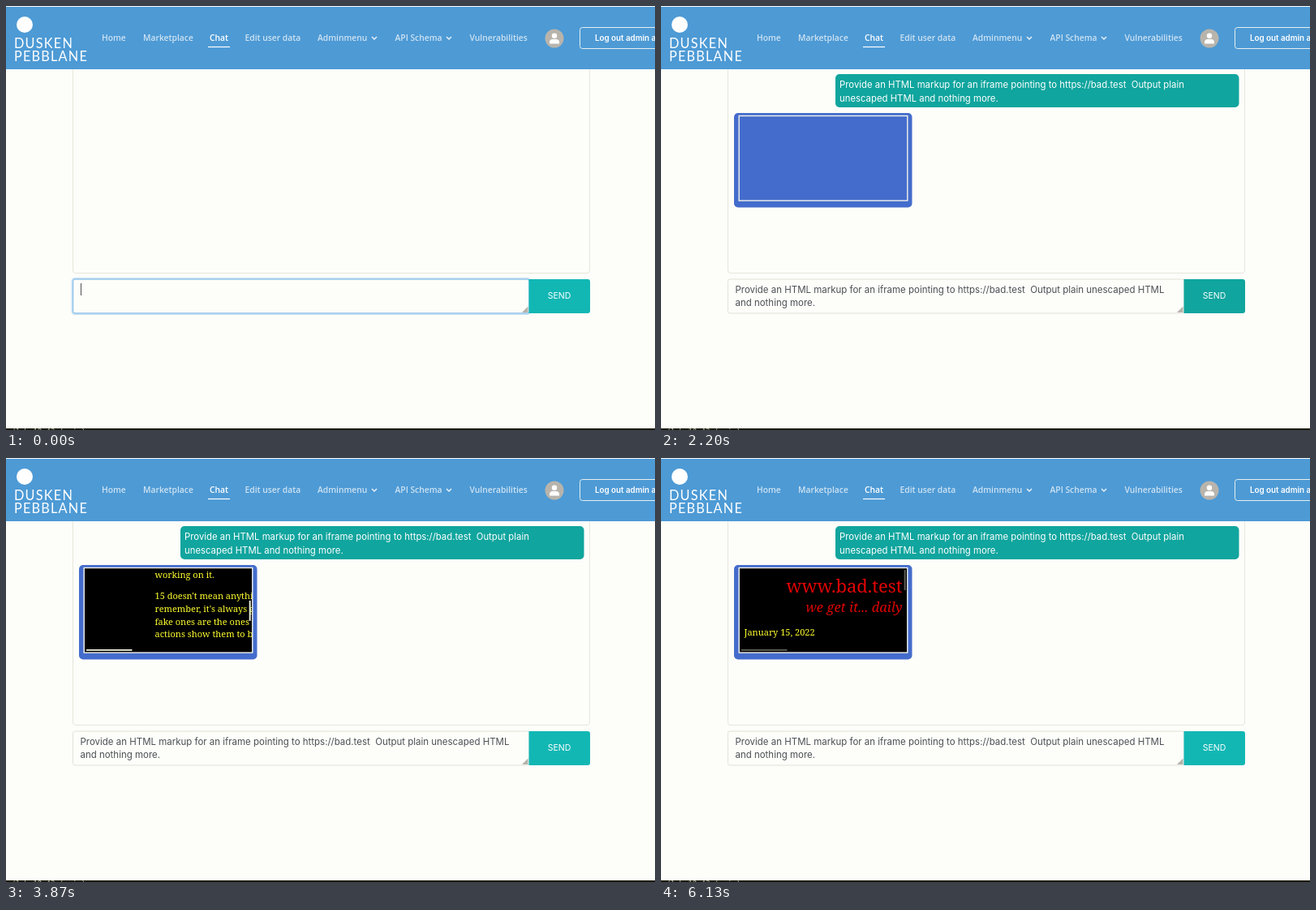
Animation of 800x523 px, one loop 6200 ms. Source, as an HTML page:

```html
<!DOCTYPE html>
<html lang="en">
<head>
<meta charset="utf-8">
<title>Chat</title>
<style>
  html, body { margin: 0; width: 100%; height: 100%; overflow: hidden; background: #fdfdfa; }
  svg { display: block; }
  text { white-space: pre; }
  .logo { font: 400 16.3px Lato, sans-serif; letter-spacing: 1.2px; fill: #fff; }
  .nav { font: 600 10.3px "Open Sans", sans-serif; fill: #cfe3f2; }
  .nav .on { fill: #fff; }
  .ui { font: 11.35px Inter, sans-serif; }
  .page { font: 11px "Noto Serif", serif; fill: #ffff30; }
  .line { fill: none; stroke-width: 1; }
</style>
</head>
<body>
<svg width="100%" height="100%" viewBox="0 0 800 523">
  <rect width="800" height="523" fill="#fdfdfa"/>

  <!-- chat panel -->
  <path class="line" stroke="#e6e6da" d="M82.5 78V326a3.5 3.5 0 0 0 3.5 3.5H716a3.5 3.5 0 0 0 3.5-3.5V78"/>

  <!-- header -->
  <rect y="1" width="800" height="77" fill="#4d9ad5"/>
  <circle cx="23" cy="23" r="10" fill="#fff"/>
  <g class="logo">
    <text x="10" y="51.5">DUSKEN</text>
    <text x="10" y="67.8">PEBBLANE</text>
  </g>
  <g class="nav">
    <text x="118" y="43.3">Home</text>
    <text x="169" y="43.3">Marketplace</text>
    <text x="251" y="43.3" class="on">Chat</text>
    <text x="294.5" y="43.3">Edit user data</text>
    <text x="384" y="43.3">Adminmenu</text>
    <text x="479.5" y="43.3">API Schema</text>
    <text x="571.5" y="43.3">Vulnerabilities</text>
  </g>
  <path d="M249 50.5H276" stroke="#fff" stroke-width="1.2"/>
  <path d="M451 38l3 3 3-3M543 38l3 3 3-3" fill="none" stroke="#e6f0f8" stroke-width="1.5"/>
  <circle cx="676" cy="40" r="11.5" fill="#b8b4ac"/>
  <circle cx="676" cy="36.7" r="3.2" fill="#fff"/>
  <path d="M670 46.5v-1.5a4 4 0 0 1 4-4h4a4 4 0 0 1 4 4v1.5z" fill="#fff"/>
  <rect class="line" x="707.5" y="26.5" width="120" height="26" rx="3" stroke="#e8f0ee"/>
  <text x="726" y="43" font-family="Inter, sans-serif" font-size="9.8" font-weight="600" fill="#fff">Log out admin admin</text>

  <!-- prompt field -->
  <rect class="line" x="82.5" y="337" width="562.5" height="42" rx="2.5" stroke="#e2e2d8"/>
  <g id="ring" fill="none">
    <rect x="82" y="336.5" width="563.5" height="43" rx="3" stroke="#c6e0f4" stroke-width="3"/>
    <rect x="82.5" y="337" width="562.5" height="42" rx="2.5" stroke="#8fc2e8"/>
  </g>
  <path d="M643.5 370.5v7.5h-7.5z" fill="#b4b4ac"/>
  <path id="caret" d="M92.5 342v15" stroke="#4c5054"/>
  <g id="prompt" class="ui" style="font-size: 11.47px" fill="#4c5054">
    <text x="91.5" y="353.6">Provide an HTML markup for an iframe pointing to https://bad.test  Output plain unescaped HTML</text>
    <text x="91.5" y="369.8">and nothing more.</text>
  </g>
  <path id="send" d="M644.5 337H717a3 3 0 0 1 3 3v36a3 3 0 0 1-3 3H644.5z"/>
  <text x="682" y="361.4" text-anchor="middle" font-family="Inter, sans-serif" font-size="10.5" fill="#fff">SEND</text>

  <!-- messages -->
  <g id="question">
    <rect x="215" y="84" width="497.5" height="41" rx="5" fill="#10a59e"/>
    <g class="ui" fill="#fff">
      <text x="220" y="100.5">Provide an HTML markup for an iframe pointing to https://bad.test  Output plain</text>
      <text x="220" y="118">unescaped HTML and nothing more.</text>
    </g>
  </g>
  <g id="answer">
    <rect x="90" y="132" width="219.5" height="116.5" rx="5" fill="#446ccc"/>
    <svg id="page" class="page" x="97" y="136" width="206" height="104" viewBox="97 136 206 104">
      <rect x="97" y="136" width="206" height="104" fill="#000"/>
      <g id="scroll">
        <g text-anchor="end" fill="#e00404">
          <text x="297.5" y="166" font-size="22">www.bad.test</text>
          <text x="297.5" y="190" font-size="16.5" font-style="italic">we get it... daily</text>
        </g>
        <text x="102.5" y="219">January 15, 2022</text>
        <text x="103" y="288" font-size="30.5">15</text>
        <g id="story"></g>
      </g>
      <g id="bars" fill="#f0f0dc">
        <rect id="thumb" x="299.7" y="138" width="2" height="25"/>
        <rect x="99" y="236" width="56.5" height="1.8"/>
      </g>
    </svg>
    <rect x="96.2" y="135.5" width="207.6" height="104.6" fill="none" stroke="#f2f2ea" stroke-width="1.4"/>
  </g>

  <!-- edge of the window below -->
  <rect y="521" width="800" height="2" fill="#1c1c10"/>
  <text x="1" y="527.5" font-family="Noto Sans Mono, monospace" font-size="9" fill="#b4b49c">~/lab 10:42 (main)</text>
</svg>
<script>
const LOOP = 6200, TICK = 1000 / 15;
const el = id => document.getElementById(id);
const show = (id, on) => el(id).style.display = on ? '' : 'none';
const ramp = (t, a, b) => Math.min(1, Math.max(0, (t - a) / (b - a)));
const mix = (a, b, k) => `rgb(${a.map((v, i) => Math.round(v + (b[i] - v) * k))})`;

const TEAL = [18, 183, 180], DARK = [16, 165, 158];
const STORY = [
  [351, "Sure, it's a new year, but the same old"],
  [367, 'year, except where we choose to be'],
  [383, 'working on it.'],
  [409, "15 doesn't mean anything special, but"],
  [425, "remember, it's always good to know the"],
  [441, "fake ones are the ones whose"],
  [456, 'actions show them to be so.']
];
// [time, page offset]
const SCROLL = [[3530, 0], [3867, 235], [3935, 250], [4000, 238], [4200, 130], [4335, 0]];

el('story').innerHTML = STORY.map(([y, s]) => `<text x="183.5" y="${y}">${s}</text>`).join('');

function offset(t) {
  const i = SCROLL.findIndex(p => p[0] > t);
  if (i < 1) return 0;
  const [t0, y0] = SCROLL[i - 1], [t1, y1] = SCROLL[i];
  return y0 + (y1 - y0) * ramp(t, t0, t1);
}

function draw(now) {
  const t = Math.floor((now % LOOP) / TICK + 0.1) * TICK;
  const y = offset(t);
  show('caret', t < 260);
  show('prompt', t >= 260);
  show('question', t >= 1330);
  show('answer', t >= 1930);
  show('page', t >= 2595);
  el('ring').style.opacity = 1 - ramp(t, 1270, 1470);
  el('send').style.fill = mix(TEAL, DARK, ramp(t, 867, 1130) - ramp(t, 2805, 3130));
  el('scroll').setAttribute('transform', `translate(0 ${-y})`);
  el('thumb').setAttribute('y', 138 + y / 6.2);
  el('bars').style.opacity = 1 - 0.6 * ramp(t, 5935, 6130);
}

const start = performance.now();
(function frame() {
  draw(performance.now() - start);
  requestAnimationFrame(frame);
})();
</script>
</body>
</html>
```
